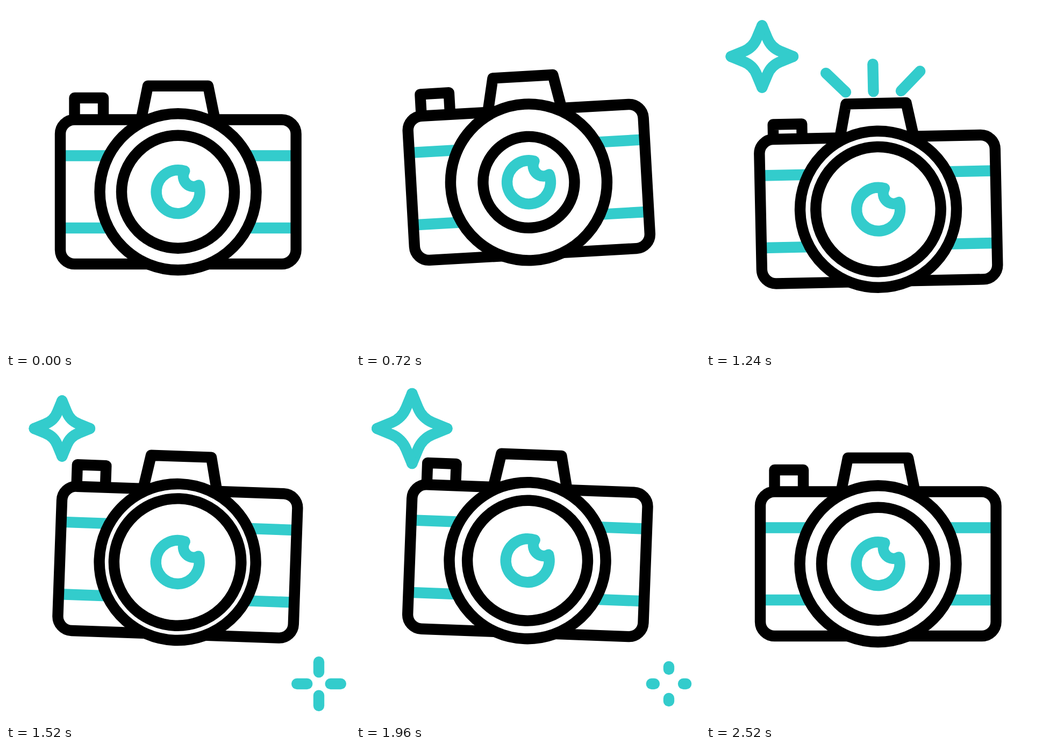
Animation, 640 px wide and 640 px high, one loop 3 s. Source, as an HTML page:

```html
<!DOCTYPE html>
<html lang="en">
<head>
<meta charset="utf-8">
<title>Camera</title>
<style>
  html, body { margin: 0; width: 100%; height: 100%; overflow: hidden; background: #fff; }
  svg { display: block; width: 100%; height: 100%; }
  svg * { stroke-width: 20.4; stroke-linejoin: round; }
  .ink { stroke: #000; }
  .tint { stroke: #3cc; }
  .glow { stroke: #3cc; stroke-linecap: round; }
  #star path { vector-effect: non-scaling-stroke; }
</style>
</head>
<body>
<svg viewBox="0 0 640 640" fill="none">
  <g id="camera">
    <g id="rays" class="glow"></g>
    <path id="button" class="ink"/>
    <path class="ink" d="M251.4 211 264 148.7H376L388.6 211"/>
    <path class="tint" d="M105 278.5H535M105 413H535"/>
    <rect class="ink" x="101" y="211.5" width="438.6" height="268.5" rx="26.5"/>
    <circle class="ink" cx="320" cy="345.7" r="145.5" fill="#fff"/>
    <circle id="ring" class="ink" cx="320" cy="345.7"/>
    <path class="tint" d="M332.3 307A40.5 40.5 0 1 0 358.7 333.4A19.4 19.4 0 0 1 332.3 307Z"/>
  </g>
  <g id="star" class="glow"></g>
  <g id="spark" class="glow"></g>
</svg>
<script>
const LOOP = 3000, STEP = 40;
const $ = id => document.getElementById(id);
const set = (el, name, value) => el.setAttribute(name, value);
const show = (el, on) => set(el, "visibility", on ? "visible" : "hidden");

let now = 0;
// Progress from 0 to 1 between two times, even or eased.
const even = (from, to) => Math.min(1, Math.max(0, (now - from) / (to - from)));
const ease = (from, to) => (1 - Math.cos(Math.PI * even(from, to))) / 2;

function addPaths(group, count, place, d = "") {
  return Array.from({ length: count }, (_, i) => {
    const el = document.createElementNS("http://www.w3.org/2000/svg", "path");
    set(el, "transform", place(i));
    set(el, "d", d);
    return group.appendChild(el);
  });
}

const quarter = i => `rotate(${90 * i})`;
const fan = i => `translate(${264 + 51.5 * i} 126.5) rotate(${45 * (i - 1)})`;
const rays = addPaths($("rays"), 3, fan);
const dashes = addPaths($("spark"), 4, quarter);
addPaths($("star"), 4, quarter, "M0-66L11-39.5C16-26.5 26.5-16 39.5-11L66 0");
set($("spark"), "transform", "translate(582 569)");

function drawCamera() {
  const tilt = -3.4 * ease(240, 800) + 5.55 * ease(980, 1580) - 2.15 * ease(1940, 2480);
  const lift = -25 * ease(240, 600) + 57.5 * ease(600, 1120)
    - 38.5 * ease(1240, 1580) + 6 * ease(1960, 2480);
  const radius = 105 - 20 * ease(240, 560) + 33.5 * ease(840, 1320) - 13.5 * ease(1420, 2520);
  const press = 13 * (ease(1080, 1200) - ease(1250, 1400));
  set($("camera"), "transform", `translate(0 ${lift}) rotate(${tilt} 320 320)`);
  set($("ring"), "r", radius);
  set($("button"), "d", `M127.5 211V${171 + press}H181V211`);
}

function drawLines(lines, start, end) {
  for (const line of lines) set(line, "d", `M0 ${-start}V${-end}`);
}

function drawFlash() {
  drawLines(rays, 51 * ease(1240, 1400), 51 * ease(1120, 1240));
  show($("rays"), now > 1120 && now < 1400);

  const grow = even(1300, 1460), fade = even(1460, 2120);
  drawLines(dashes, 10 + 11 * grow + 8 * fade, 10 + 32 * grow - 13 * fade);
  show($("spark"), grow > 0 && fade < 1);

  const size = 67.5 * (ease(1060, 1300) - ease(1910, 2320))
    - 19 * (ease(1300, 1600) - ease(1600, 1900));
  set($("star"), "transform", `translate(104.3 94) scale(${Math.max(size, 1) / 66})`);
  show($("star"), size > 1);
}

function tick() {
  now = Math.floor(performance.now() % LOOP / STEP) * STEP;
  drawCamera();
  drawFlash();
  requestAnimationFrame(tick);
}
tick();
</script>
</body>
</html>
```
